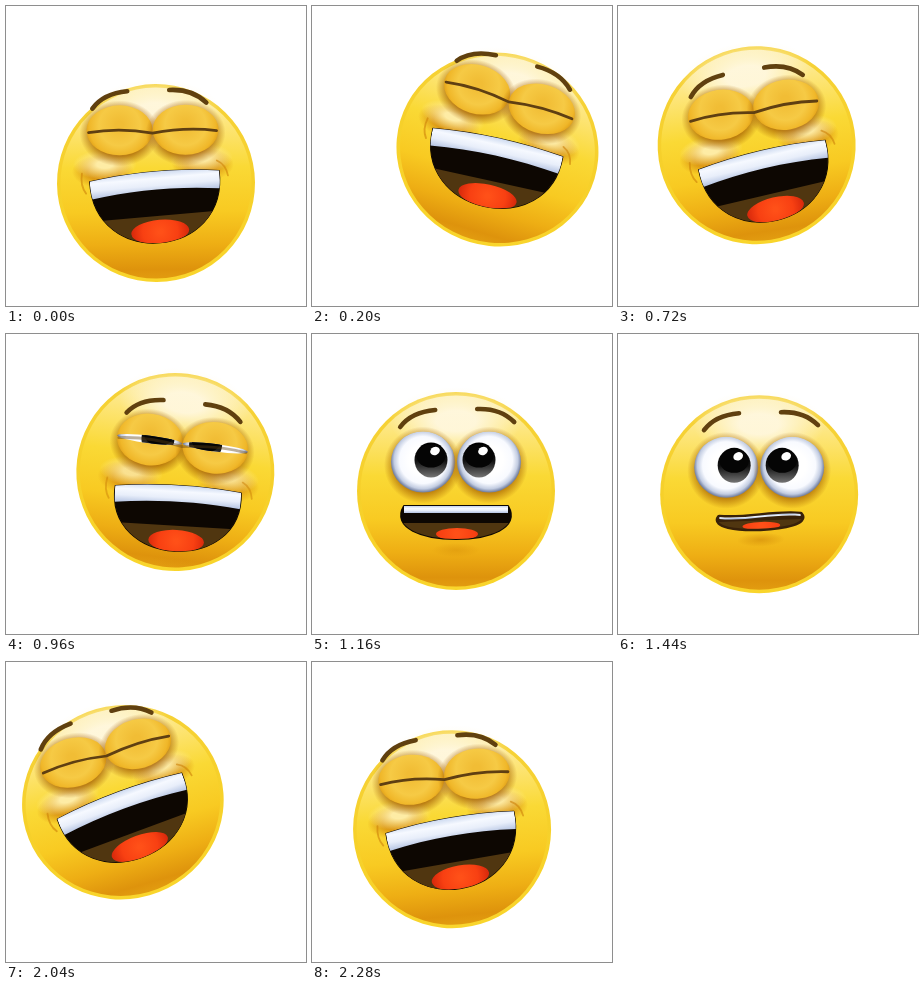
These frames come from a looping animation (300 by 300 pixels, 2.32 s). An HTML page with a canvas:

```html
<!DOCTYPE html>
<html>
<head>
<meta charset="utf-8">
<style>
html, body { margin: 0; width: 100%; height: 100%; overflow: hidden; background: #fff; }
canvas { display: block; width: 300px; height: 300px; }
</style>
</head>
<body>
<canvas id="stage" width="300" height="300"></canvas>
<script>
const ctx = document.getElementById('stage').getContext('2d');
const LOOP = 2320, STEP = 40;
const LAUGH_START = 1840; // loop time at which the calm face bursts out laughing

// Turning points of the rocking head; dip is how far it sags on the way there
const TURNS = [
  { at: 0, x: 140, y: 161.5, tilt: 0 },
  { at: 255, x: 114, y: 128, tilt: -18, dip: 10 },
  { at: 705, x: 186, y: 128, tilt: 17, dip: 57 },
  { at: 1060, x: 118, y: 132, tilt: -19, dip: 12 },
  { at: 1390, x: 172, y: 136, tilt: 8, dip: 8 },
  { at: 1640, x: 144, y: 157, tilt: 0, dip: 0 },
  { at: 2080, x: 140, y: 161.5, tilt: 0, dip: 0 }
];

const FLAT = { w: 36, top: 24, h: 5, round: 1.3, arch: 0, wave: 5, tilt: -3, teeth: 0, edge: 0, line: 6, tongue: 18, thick: 3 };
const OPEN = { w: 52, top: 15, h: 33, round: 1.5, arch: 0, wave: 0, tilt: 0, teeth: 7, edge: 17, line: 2, tongue: 21, thick: 6 };
const LAUGH = { w: 65, top: -7, h: 67, round: 1.05, arch: 6, wave: 0, tilt: -4.5, teeth: 18, edge: 40, line: 1, tongue: 29, thick: 12 };

const mix = (a, b, k) => a + (b - a) * k;
const clamp = k => Math.min(1, Math.max(0, k));
const swing = k => (1 - Math.cos(Math.PI * clamp(k))) / 2;
const ramp = (t, a, b) => swing((t - a) / (b - a));
const radians = deg => deg * Math.PI / 180;

function blend(a, b, k) {
  const out = {};
  for (const key in a) out[key] = mix(a[key], b[key], k);
  return out;
}

function poseAt(t) {
  const next = TURNS.findIndex(turn => turn.at > t);
  if (next < 0) return TURNS[TURNS.length - 1];
  const a = TURNS[next - 1], b = TURNS[next];
  const k = (t - a.at) / (b.at - a.at);
  const pose = blend(a, b, swing(k));
  pose.y += b.dip * Math.sin(Math.PI * k ** 1.6);
  return pose;
}

function paint(grad, stops) {
  stops.forEach(([at, color]) => grad.addColorStop(at, color));
  return grad;
}
const linear = (y0, y1, ...stops) => paint(ctx.createLinearGradient(0, y0, 0, y1), stops);
const radial = (x, y, r0, r1, ...stops) => paint(ctx.createRadialGradient(x, y, r0, x, y, r1), stops);

function oval(x, y, rx, ry, fill) {
  ctx.beginPath();
  ctx.ellipse(x, y, rx, ry, 0, 0, 7);
  if (fill) { ctx.fillStyle = fill; ctx.fill(); }
}

function line(d, color, width) {
  ctx.strokeStyle = color;
  ctx.lineWidth = width;
  ctx.stroke(new Path2D(d));
}

function glow(x, y, rx, ry, rgb, alpha, core = 0) {
  ctx.save();
  ctx.translate(x, y);
  ctx.scale(rx, ry);
  oval(0, 0, 1, 1, radial(0, 0, core, 1, [0, `rgba(${rgb},${alpha})`], [1, `rgba(${rgb},0)`]));
  ctx.restore();
}

// Draws a part in its own shifted, tilted and faded space
function at(x, y, draw, alpha = 1, tilt = 0) {
  ctx.save();
  ctx.translate(x, y);
  ctx.rotate(radians(tilt));
  ctx.globalAlpha *= alpha;
  draw();
  ctx.restore();
}

function head() {
  oval(0, 0, 99, 99, linear(-99, 99, [0, '#f6d23a'], [.5, '#f6d02a'], [1, '#f9d52c']));
  oval(0, 0, 95.5, 95.5, linear(-96, 96, [0, '#fdf0b8'], [.2, '#fde578'],
    [.42, '#fad935'], [.65, '#f8ca22'], [.82, '#eeae14'], [.95, '#de930c'], [1, '#e29c10']));
  glow(0, -70, 66, 34, '255,248,226', .9, .3);
}

function brows() {
  line('M-60-74Q-49-89-25-91', '#60400f', 4.6);
  line('M17-92Q40-93 54-79', '#60400f', 4.6);
}

function eye(side, open) {
  const x = side * 33, rx = mix(33, 32, open), ry = mix(25, 30.5, open);
  glow(x, 3, rx + 7, ry + 8, '165,95,0', .75, .7);
  oval(x, 0, rx, ry, radial(x, -5, 4, rx + 4, [0, '#f1bd35'], [.5, '#f6ca45'], [.8, '#f0b729'], [1, '#d8940f']));
  if (open < .03) return;
  ctx.save();
  oval(x, 0, rx, ry * open);
  ctx.clip();
  oval(x, 0, 33, 31.5, radial(x, -2, 14, 33, [0, '#fff'], [.5, '#f8faff'], [.78, '#c3cde2'], [1, '#5f6d90']));
  const px = x - side * 9 - 1;
  oval(px, -2, 16.5, 17.5, linear(-18, 16, [0, '#000'], [.5, '#111'], [1, '#777']));
  oval(px, -6, 14.5, 11.5, '#050505');
  at(px + 4, -11, () => oval(0, 0, 5, 4, '#fff'), 1, -25);
  ctx.restore();
}

function mouth(level) {
  const m = level > 1 ? blend(OPEN, LAUGH, level - 1) : blend(FLAT, OPEN, level);
  const { w, top, h, arch, wave } = m, bottom = top + h;
  const lip = (path, dy) => path.bezierCurveTo(
    -w / 3, top - arch + wave + dy, w / 3, top - arch - wave + dy, w, top + dy);
  const shape = new Path2D(), teeth = new Path2D();
  shape.moveTo(-w, top);
  lip(shape, 0);
  shape.bezierCurveTo(w * m.round, top + h * 4 / 3, -w * m.round, top + h * 4 / 3, -w, top);
  shape.closePath();
  teeth.moveTo(-w, top + m.teeth);
  lip(teeth, m.teeth);
  teeth.lineTo(w, top - 20);
  teeth.lineTo(-w, top - 20);

  glow(0, bottom + 11, 24, 7, '195,115,0', .5 * (1 - level / 2));
  const dark = `rgb(${mix(74, 13, clamp(level))},${mix(44, 7, clamp(level))},${mix(12, 2, clamp(level))})`;
  ctx.strokeStyle = ctx.fillStyle = dark;
  ctx.lineWidth = m.line;
  ctx.stroke(shape);
  ctx.fill(shape);
  ctx.clip(shape);
  ctx.fillStyle = '#503610';
  ctx.fillRect(-80, top + m.edge, 160, 90);
  const ty = bottom - m.thick + 1;
  oval(1, ty, m.tongue, m.thick, radial(1, ty, 2, 28, [0, '#ff5018'], [.6, '#f84012'], [1, '#d92a0c']));
  if (m.teeth > .5) {
    ctx.fillStyle = linear(top - arch, top + m.teeth,
      [0, '#c3d2ec'], [.35, '#f6f9ff'], [.65, '#e8eefa'], [1, '#b4c3e2']);
    ctx.fill(teeth);
  }
}

function cheeks() {
  for (const side of [-1, 1]) {
    const y = -22 - side * 3;
    glow(side * 50, y + 7, 31, 17, '205,120,5', .65, .5);
    glow(side * 48, y, 32, 15, '254,236,165', 1, .25);
  }
  line('M-71-10Q-73 2-67 10', 'rgba(205,130,10,.6)', 1.8);
  line('M64-22Q73-18 75-7', 'rgba(205,130,10,.6)', 1.8);
}

function draw(t) {
  const { x, y, tilt } = poseAt(t);
  const open = 1 - ramp(t, 0, 140) + ramp(t, 1400, 1560);
  const level = 2 * ramp(t, 0, 180) - ramp(t, 1380, 1620) - ramp(t, 1640, 2080);
  const laugh = clamp(level - 1);
  const stretch = clamp((Math.abs(tilt) - 10) / 7) * .025;
  // the features slide over the head as it nods forward
  const nod = 27 * (1 - ramp(t, 0, 190)) + 24 * ramp(t, 760, 1440) + 3 * ramp(t, 1640, 2080);
  const drift = nod * .3 - 3;

  ctx.setTransform(1, 0, 0, 1, 0, 0);
  ctx.fillStyle = '#fff';
  ctx.fillRect(0, 0, 300, 300);
  ctx.translate(x, y);
  ctx.rotate(radians(tilt));
  ctx.scale(1 + stretch, 1 - stretch);
  ctx.lineCap = ctx.lineJoin = 'round';

  head();
  at(drift, nod, cheeks, laugh);
  at(drift * (1 - open), nod - 53, () => {
    eye(-1, open);
    eye(1, open);
    at(0, 53, () => line('M-64-51Q-33-56 0-50Q33-56 64-52', '#5f3f12', 2.8), clamp(1 - open * 4));
  });
  at(drift, mix(nod - 1, 10, open), brows);
  at((drift + 2) * laugh, nod * laugh, () => mouth(level), 1, mix(FLAT.tilt, 0, clamp(level)) + LAUGH.tilt * laugh);
}

const start = performance.now();
function frame() {
  const t = Math.floor((performance.now() - start) % LOOP / STEP) * STEP;
  draw((t + LOOP - LAUGH_START) % LOOP);
  requestAnimationFrame(frame);
}
frame();
</script>
</body>
</html>
```
